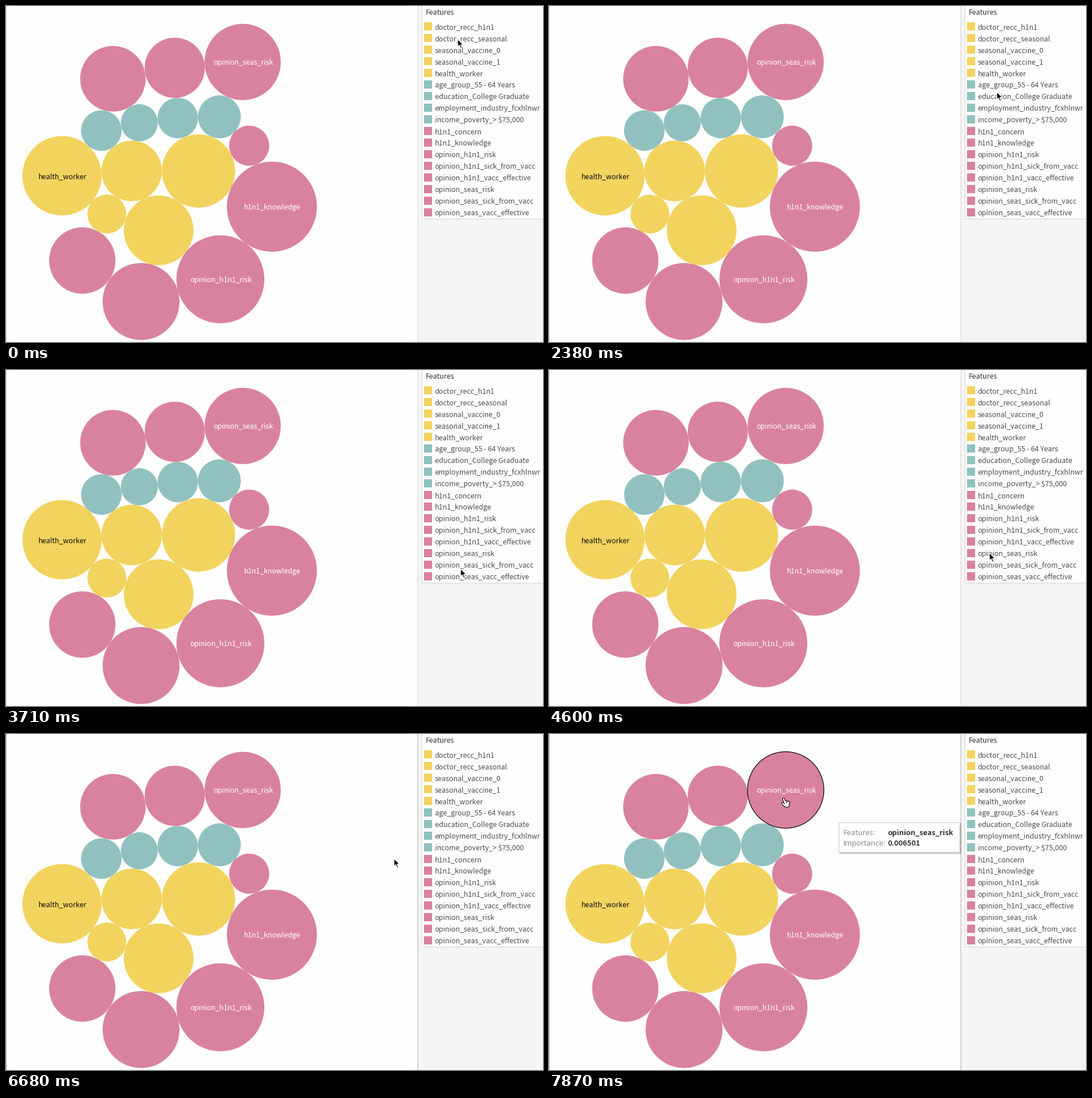
Recreate the animation shown at these times as a matplotlib script. Size 925 px wide and 578 px high, loop 8000 ms.

```python
import matplotlib.pyplot as plt
from matplotlib.animation import FuncAnimation
from matplotlib.patches import Circle, Polygon, Rectangle

W, H, DPI = 925, 578, 64
PT = 72 / DPI  # points per pixel
STEPS, LOOP_MS = 54, 8000
YELLOW, TEAL, PINK = "#f2d35d", "#91c1be", "#d9829f"
GREY_LINE, DARK_LINE = "#d4d4d4", "#b4b4b4"
FOCUS_STEP, HOVER_STEP = 40, 53

# Radii in packing order: the centre, a ring around it, then an outer arc
CENTRE, CENTRE_R, FIRST_R = 216.5 + 283.8j, 52.1, 63
RING = [(YELLOW, [60, 33.4, 68.2]), (TEAL, [34.9, 31.9, 34.8, 36.9]),
        (PINK, [34.5, 77.5, 75.7, 66.2, 57.1])]
ARC = [(PINK, [56.4, 51.8, 65.6])]
ARC_START = 5  # the arc begins on the first teal bubble

# Which packed bubble carries a label, and in what colour
BUBBLE_LABELS = {4: ("health_worker", "#111111"), 10: ("h1n1_knowledge", "white"),
                 11: ("opinion_h1n1_risk", "white"),
                 16: ("opinion_seas_risk", "white")}
LEGEND = [
    (YELLOW, ["doctor_recc_h1n1", "doctor_recc_seasonal", "seasonal_vaccine_0",
              "seasonal_vaccine_1", "health_worker"]),
    (TEAL, ["age_group_55 - 64 Years", "education_College Graduate",
            "employment_industry_fcxhlnwr", "income_poverty_> $75,000"]),
    (PINK, ["h1n1_concern", "h1n1_knowledge", "opinion_h1n1_risk",
            "opinion_h1n1_sick_from_vacc", "opinion_h1n1_vacc_effective",
            "opinion_seas_risk", "opinion_seas_sick_from_vacc",
            "opinion_seas_vacc_effective"]),
]


def ease_in(t):
    return t ** 2.2


def ease_out(t):
    return 1 - (1 - t) ** 1.5


def smooth(t):
    return t * t * (3 - 2 * t)


# Pointer moves: first step, last step, goal, easing, sideways bow
START = 778 + 57j
MOVES = [(0, 2, 774 + 76j, ease_out, 0), (7, 23, 782 + 331j, ease_in, -6),
         (23, 25, 783 + 342j, ease_out, 0), (28, 38, 670 + 215j, smooth, 0),
         (44, 52, 511 + 149j, ease_in, 0)]
ARROW = [0, 13.2j, 3 + 10.4j, 5.2 + 15.6j, 7.5 + 14.6j, 5.3 + 9.6j, 9.5 + 9.4j]

plt.rcParams["font.family"] = "Noto Sans CJK JP"
fig = plt.figure(figsize=(W / DPI, H / DPI), dpi=DPI, facecolor="#f5f5f5")
ax = fig.add_axes([0, 0, 1, 1])
ax.set(xlim=(0, W), ylim=(H, 0))
ax.axis("off")


def box(x, y, w, h, color, z=1, **kw):
    return ax.add_patch(Rectangle((x, y), w, h, fc=color, lw=0, zorder=z, **kw))


def label(text, x, y, color, size=12.15, z=3, **kw):
    return ax.text(x, y, text, color=color, fontsize=size * PT, zorder=z,
                   va="baseline", parse_math=False, **kw)


def roll(r, prev, placed):
    """Roll a circle clockwise off prev until it rests on a neighbour."""
    p, rp = prev
    spots = []
    for q, rq in placed:
        d, a, b = abs(q - p), rp + r, rq + r
        if 0 < d <= a + b:
            along = (a * a - b * b + d * d) / (2 * d)
            across = max(a * a - along * along, 0) ** 0.5
            spots.append(p + (along - 1j * across) * (q - p) / d)
    return max(spots, key=lambda s: min(abs(s - c) - rc - r for c, rc in placed))


def pack():
    placed = [(CENTRE, CENTRE_R), (CENTRE + CENTRE_R + FIRST_R, FIRST_R)]
    colors = [YELLOW, YELLOW]
    for start, groups in ((1, RING), (ARC_START, ARC)):
        prev = placed[start]
        for color, radii in groups:
            for r in radii:
                prev = (roll(r, prev, placed), r)
                placed.append(prev)
                colors.append(color)
    return [(c.real, c.imag, r, color) for (c, r), color in zip(placed, colors)]


def draw_sheet(bubbles):
    box(0, 0, 710, H, "#fefefe")
    for x, y, r, color in bubbles:
        ax.add_patch(Circle((x, y), r, fc=color, lw=0, zorder=2))
    for i, (text, color) in BUBBLE_LABELS.items():
        x, y = bubbles[i][:2]
        label(text, x + 1, y + 5, color, ha="center")
    return [box(x, 0, 1, H, GREY_LINE) for x in (0, 709)]


def draw_legend():
    box(716, 0, 209, 367, GREY_LINE)
    box(717, 0, 208, 366, "#fefefe")
    label("Features", 722.5, 15, "#333333")
    rows = [(color, name) for color, names in LEGEND for name in names]
    for i, (color, name) in enumerate(rows):
        y = 35 + 20 * i
        box(720, y - 7, 14, 14, color)
        label(name, 738.6, y + 5, "#4d4d4d")


def draw_tooltip(x, y, r):
    parts = [ax.add_patch(Circle((x, y), r + 0.2, fc="none", ec="black",
                                 lw=1.2 * PT, zorder=2.5))]
    for grow in (3, 2, 1):
        parts.append(box(500, 153, 208 + grow, 51 + grow, "black", 4, alpha=0.09))
    parts += [box(499, 152, 209, 52, "#cccccc", 4),
              box(500, 153, 207, 50, "white", 4)]
    rows = [("Features:", "opinion_seas_risk"), ("Importance:", "0.006501")]
    for y, (key, value) in zip((174, 192), rows):
        parts.append(label(key, 506.5, y, "#8a8a8a", 12.9, 5))
        parts.append(label(value, 583.5, y, "#333333", 12.7, 5, weight="bold"))
    return parts


def draw_hand(x, y):
    """Round strokes for index, three fingers, thumb and palm, with an outline."""
    strokes = [(4, 2.6, 7, 11, 2.3), (2.2, 10, 6, 14, 2.3),
               (8.4, 13.2, 10.4, 13.6, 6)]
    strokes += [(6 + 2.3 * k, 6.8 + 0.4 * k, 6 + 2.3 * k, 11, 2) for k in (1, 2, 3)]
    return [line for color, extra, z in (("black", 2, 6), ("white", 0, 7))
            for x0, y0, x1, y1, width in strokes
            for line in ax.plot([x + x0, x + x1], [y + y0, y + y1], color=color,
                                lw=(width + extra) * PT, zorder=z,
                                solid_capstyle="round")]


def pointer(step):
    pos = START
    for first, last, goal, ease, bow in MOVES:
        s = ease(min(max((step - first) / (last - first), 0), 1))
        pos += (goal - pos) * s + 4 * bow * s * (1 - s)
    return pos


bubbles = pack()
edges = draw_sheet(bubbles)
draw_legend()
hover = draw_tooltip(*bubbles[-1][:3]) + draw_hand(400, 109)
arrow = ax.add_patch(Polygon([(0, 0)] * len(ARROW), fc="black", ec="white",
                             lw=1.2 * PT, joinstyle="round", zorder=6))


def update(step):
    corners = [pointer(step) + c for c in ARROW]
    arrow.set_xy([(c.real, c.imag) for c in corners])
    hovering = step >= HOVER_STEP
    arrow.set_visible(not hovering)
    for part in hover:
        part.set_visible(hovering)
    for edge in edges:
        edge.set_facecolor(DARK_LINE if step >= FOCUS_STEP else GREY_LINE)
    return [arrow, *hover, *edges]


anim = FuncAnimation(fig, update, frames=STEPS, interval=LOOP_MS / STEPS,
                     repeat=True, repeat_delay=0, blit=False)
plt.show()
```
